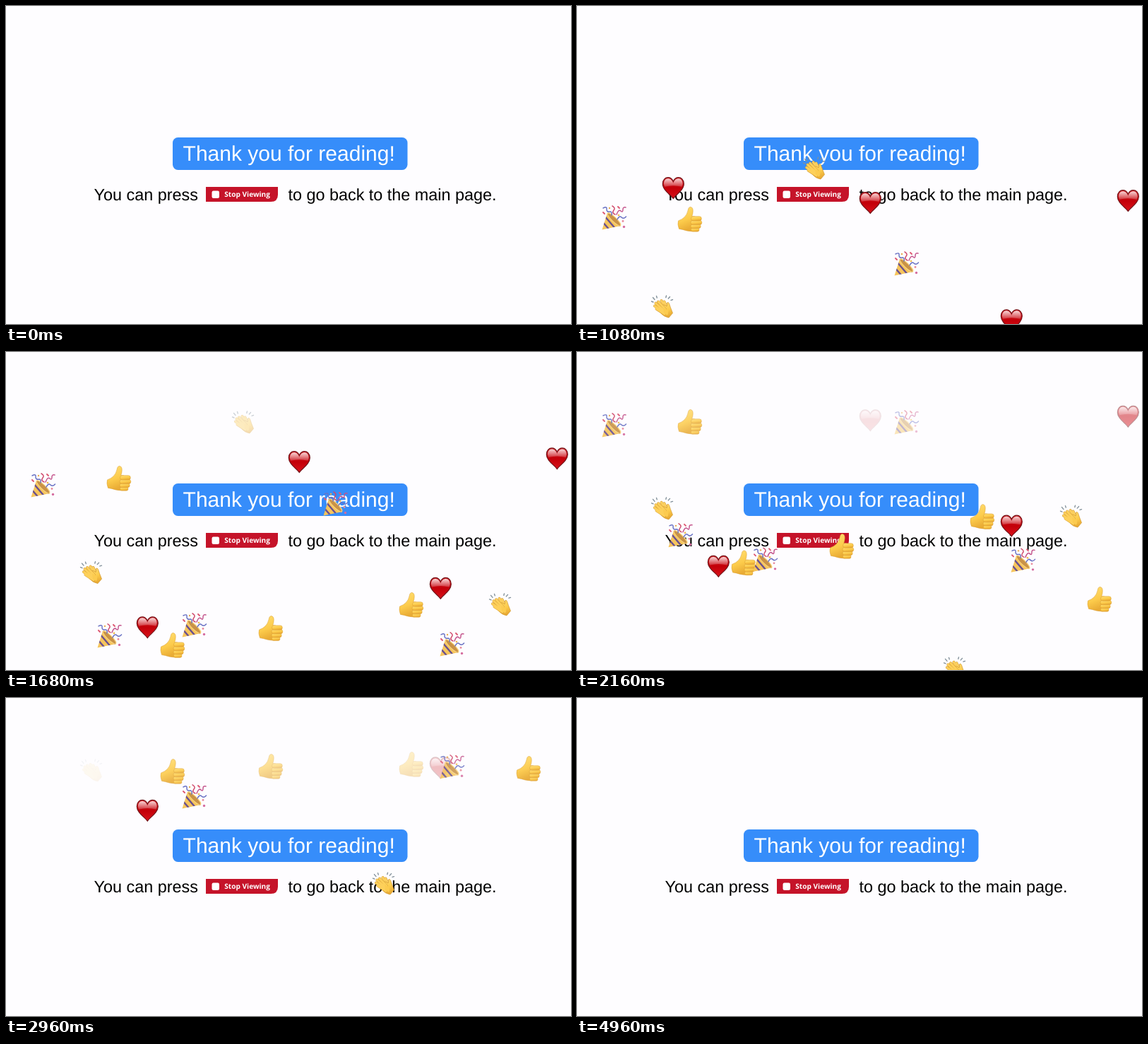
Animation of 800 by 450 pixels, one loop 5000 ms. Source, as an HTML page:

```html
<!DOCTYPE html>
<html lang="en">
<head>
<meta charset="utf-8">
<title>Thank you</title>
<style>
  html, body { margin: 0; width: 100%; height: 100%; overflow: hidden; background: #fefdff; }
  svg { display: block; width: 100vw; height: 100vh; }
  text { font-family: "Liberation Sans", Arial, sans-serif; text-rendering: geometricPrecision; }
  .label { font: 700 10.1px "Open Sans", "Noto Sans", sans-serif; }
</style>
</head>
<body>
<svg id="stage" viewBox="0 0 800 450">
  <defs>
    <linearGradient id="red" x1="0" y1="0" x2="0" y2="1">
      <stop offset="0" stop-color="#d8262b"/>
      <stop offset=".5" stop-color="#c30009"/>
      <stop offset="1" stop-color="#d8121a"/>
    </linearGradient>
    <linearGradient id="gloss" x1="0" y1="0" x2="0" y2="1">
      <stop offset="0" stop-color="#fff" stop-opacity=".8"/>
      <stop offset="1" stop-color="#fff" stop-opacity=".18"/>
    </linearGradient>
    <linearGradient id="skin" x1="0" y1="0" x2=".3" y2="1">
      <stop offset="0" stop-color="#ffdf75"/>
      <stop offset=".6" stop-color="#fccb4b"/>
      <stop offset="1" stop-color="#e9ab35"/>
    </linearGradient>
    <clipPath id="coneClip"><path d="M-16.5 16.5L-9 -7Q2 -3 10 11Z"/></clipPath>

    <g id="heart" transform="translate(.3 .8)">
      <path d="M0 14.8C-4 9-15 3-15-6C-15-12-11-15-7.5-15C-4-15-1.5-13 0-9.5C1.5-13 4-15 7.5-15C11-15 15-12 15-6C15 3 4 9 0 14.8Z" fill="url(#red)" stroke="#73141a" stroke-width="1.2"/>
      <path d="M0-7C-1.5-11.5-4.5-13.5-7.5-13.5C-11-13.5-13.5-10-13.3-6Q-13-3.5-12-2Q0-5 12-2Q13-3.5 13.3-6C13.5-10 11-13.5 7.5-13.5C4.5-13.5 1.5-11.5 0-7Z" fill="url(#gloss)"/>
    </g>

    <g id="thumb" stroke="#d99b30" stroke-width=".5">
      <path d="M-16.5 2Q-11 0-8-3Q-4-7-2.8-13Q-2.2-17.5 .8-17.5Q4.4-17 4.2-11.5Q4-7.5 2.8-4.5L7-4L9 16Q3 18-5 16Q-11 14-15.5 13.5Q-18 7-16.5 2Z" fill="url(#skin)"/>
      <g fill="url(#skin)">
        <rect x="1.5" y="12" width="11.5" height="5.3" rx="2.6"/>
        <rect x="1" y="7" width="14.2" height="5.8" rx="2.9"/>
        <rect x="1" y="1.5" width="15.8" height="6.2" rx="3.1"/>
        <rect x="1.5" y="-4.2" width="14.8" height="6.4" rx="3.1"/>
      </g>
    </g>

    <g id="party" fill="none" stroke-linecap="round">
      <path d="M-16.5 16.5L-9 -7Q2 -3 10 11Z" fill="#f6c55c"/>
      <path d="M-18 3L-4 19M-14-4L4 17M-9-8L11 14" stroke="#6b518f" stroke-width="2.4" clip-path="url(#coneClip)"/>
      <ellipse cx=".5" cy="2" rx="3.2" ry="12.6" transform="rotate(-46 .5 2)" fill="#c99247" stroke="#f8d37c" stroke-width="1.2"/>
      <g stroke-width="1.5">
        <path d="M-15-14Q-9-17-10-12Q-10-8-5-9Q-2-9-3-4" stroke="#6a72c4"/>
        <path d="M-2-17Q3-14 0-11Q-3-7 2-5" stroke="#cf4a6c"/>
        <path d="M4-5Q7-13 10-10Q13-7 13-12Q13-16 17-15" stroke="#c4558d"/>
        <path d="M5 2Q8-4 11-1Q14 2 17.5-2" stroke="#6a72c4"/>
      </g>
      <path d="M-15-8L-13-6M6-16L8-14" stroke="#de5c76" stroke-width="2"/>
      <g stroke="none">
        <circle cx="-6" cy="-14" r="1.2" fill="#e9ac50"/>
        <circle cx="13" cy="4.5" r="1.4" fill="#e88a9c"/>
        <circle cx="14.5" cy="12.5" r="1.7" fill="#d56c9f"/>
        <circle cx="7" cy="-4" r="1.3" fill="#eeb84a"/>
      </g>
    </g>

    <g id="clap" stroke-linecap="round" stroke-linejoin="round" fill="none">
      <path d="M-15.5-7L-13-6M-13.5-12.5L-11-9.5M-8.5-14.5L-7.7-12M5.5-15L4.8-12.5M10.5-13.5L8.3-11M14.5-9.5L12-8.7" stroke="#82909a" stroke-width="1.4"/>
      <path d="M5 3L-1.5-8M8 5L2.5-6.5" stroke="#cf9430" stroke-width="4"/>
      <path d="M5 3L-1.5-8M8 5L2.5-6.5" stroke="#fbcf5e" stroke-width="3.2"/>
      <path d="M-3-2Q3-3 6 0Q7-3 6.5-5Q8-7 9.5-4Q11 1 14.5 9.5L9 16Q2 15-3 9Z" fill="url(#skin)" stroke="#d09530" stroke-width=".7"/>
      <path d="M4 4L-6-6.5M2 6L-9.5-4.5M1 8L-11-.5M3 11L-8.5 3.5" stroke="#d09530" stroke-width="3.9"/>
      <path d="M4 4L-6-6.5M2 6L-9.5-4.5M1 8L-11-.5M3 11L-8.5 3.5" stroke="#fdd05a" stroke-width="3.1"/>
      <path d="M2 3L8 6L7 12L3 10Z" fill="#fccb4f" stroke="#fccb4f"/>
    </g>
  </defs>

  <rect width="800" height="450" fill="#fefdff"/>
  <rect x="236" y="186" width="332.5" height="46" rx="7.5" fill="#368dfa"/>
  <text x="250.6" y="218.8" font-size="30" fill="#fff">Thank you for reading!</text>
  <g font-size="23.4">
    <text x="124.6" y="275">You can press</text>
    <text x="399.4" y="275">to go back to the main page.</text>
  </g>
  <path d="M283 256H385V267Q385 277 375 277H283Z" fill="#c51329"/>
  <rect x="291.5" y="261.5" width="10.5" height="10.5" rx="2.2" fill="#fff"/>
  <text class="label" x="309.3" y="270.2" fill="#fff">Stop Viewing</text>
  <g id="floaters"></g>
</svg>
<script>
const LOOP = 5000, STEP = 40, START_Y = 470;

// kind, x, birth (ms), speed (px/ms), resting y, time of vanishing (ms)
const floaters = [
  ["clap", 336, 76, .24, 99, 1800],
  ["heart", 136, 488, .36, 98, 1670],
  ["heart", 415, 143, .205, 96, 2200],
  ["heart", 780, 142, .208, 90.5, 2330],
  ["party", 52, 161, .185, 104, 2525],
  ["thumb", 160, 260, .205, 99, 2471],
  ["party", 466, 660, .25, 100, 2285],
  ["clap", 121, 842, .189, 102, 2992],
  ["heart", 615, 939, .184, 97, 3060],
  ["party", 146, 1450, .296, 95, 2930],
  ["heart", 200, 1230, .18, 95, 3550],
  ["thumb", 236, 1454, .243, 104, 3237],
  ["party", 266, 1250, .193, 91, 3480],
  ["thumb", 375, 1354, .242, 97, 3146],
  ["party", 631, 1453, .247, 97, 3218],
  ["thumb", 574, 1249, .26, 94, 3061],
  ["clap", 700, 1245, .26, 96, 2920],
  ["thumb", 740, 1776, .3125, 100, 3188],
  ["clap", 535, 2060, .231, 96, 3826]
].map(([kind, x, birth, speed, restY, end]) => {
  const node = document.createElementNS("http://www.w3.org/2000/svg", "use");
  node.setAttribute("href", "#" + kind);
  document.getElementById("floaters").append(node);
  return { node, x, birth, speed, restY, end, fade: 75 / speed };
});

function draw(t) {
  for (const f of floaters) {
    const alive = t >= f.birth && t < f.end;
    const y = Math.max(f.restY, START_Y - f.speed * (t - f.birth));
    f.node.setAttribute("visibility", alive ? "visible" : "hidden");
    f.node.setAttribute("transform", `translate(${f.x} ${y.toFixed(2)})`);
    f.node.setAttribute("opacity", Math.max(0, Math.min(1, (f.end - t) / f.fade)).toFixed(3));
  }
}

const began = performance.now();
function tick() {
  const t = (performance.now() - began) % LOOP;
  draw(Math.floor(t / STEP) * STEP);
  requestAnimationFrame(tick);
}
tick();
</script>
</body>
</html>
```
